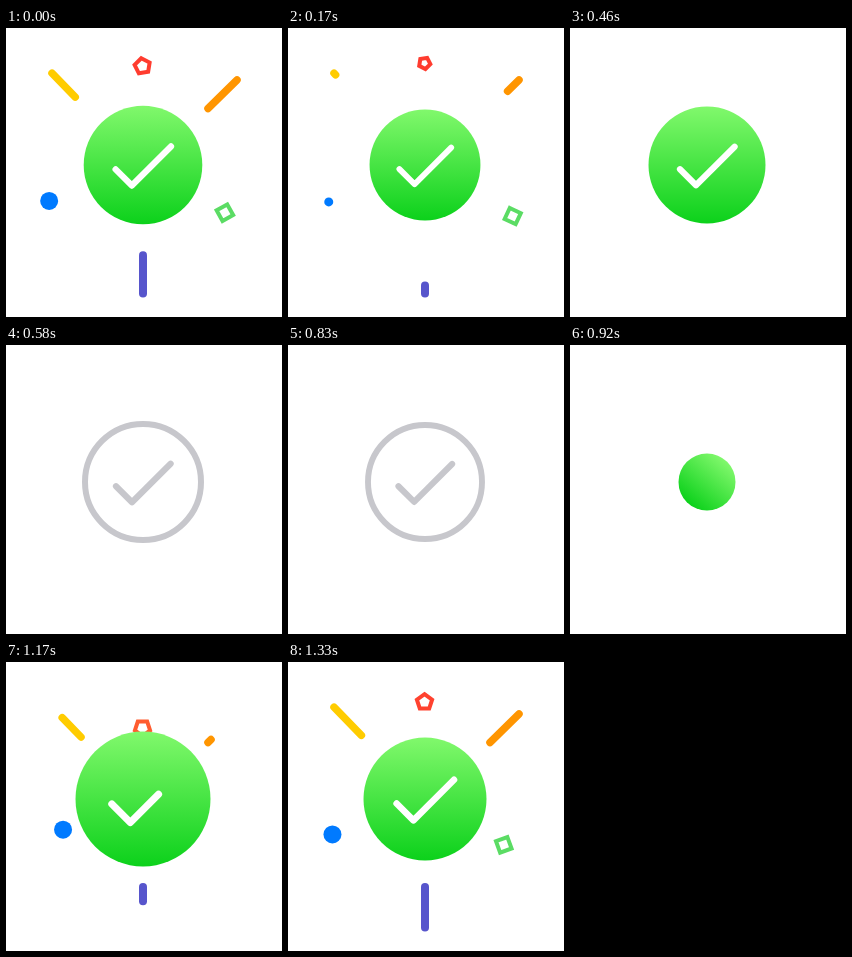
Animation, 276 px wide and 289 px high, one loop 1.37 s. Source, as an HTML page with a canvas:

```html
<!DOCTYPE html>
<html lang="en">
<head>
<meta charset="utf-8">
<title>Check burst</title>
<style>
  html, body { margin: 0; width: 100%; height: 100%; overflow: hidden; background: #fff; }
  canvas { display: block; width: 276px; height: 289px; }
</style>
</head>
<body>
<canvas id="stage"></canvas>
<script>
const W = 276, H = 289, LOOP = 1370, STEPS = 33;
const BASE = 58.5, GREY = '#c7c7cc';
const canvas = document.getElementById('stage');
const ctx = canvas.getContext('2d');
const dpr = window.devicePixelRatio || 1;
canvas.width = W * dpr;
canvas.height = H * dpr;

const clamp = x => Math.min(1, Math.max(0, x));
const lerp = (a, b, u) => a + (b - a) * u;
const ramp = (f, a, b) => {
  const u = clamp((f - a) / (b - a));
  return u * u * (3 - 2 * u);
};
const rad = deg => deg * Math.PI / 180;

// 24 steps per second, each start rounded to 10 ms
const stepStart = n => Math.round(n * 1000 / 240 - 0.01) * 10;
function stepAt(ms) {
  let n = 0;
  while (n < STEPS - 1 && stepStart(n + 1) <= ms) n++;
  return n;
}

function line(points, width, color) {
  ctx.beginPath();
  points.forEach(([x, y]) => ctx.lineTo(x, y));
  ctx.lineWidth = width;
  ctx.lineCap = ctx.lineJoin = 'round';
  ctx.strokeStyle = color;
  ctx.stroke();
}

function polygon(x, y, sides, r, turn, color) {
  ctx.beginPath();
  for (let i = 0; i < sides; i++) {
    const a = rad(turn - 90) + i * 2 * Math.PI / sides;
    ctx.lineTo(x + r * Math.cos(a), y + r * Math.sin(a));
  }
  ctx.closePath();
  ctx.lineWidth = 4;
  ctx.lineJoin = 'miter';
  ctx.strokeStyle = color;
  ctx.stroke();
}

// A ray grows outward from its inner end, then is wiped from the inside
function ray(f, a, b, grow, wipe, width, color) {
  const head = ramp(f, grow, grow + 5);
  const tail = ramp(f, wipe, wipe + 7);
  if (head - tail <= 0.001) return;
  const at = u => [lerp(a[0], b[0], u), lerp(a[1], b[1], u)];
  line([at(tail), at(head)], width, color);
}

const drift = (f, far, gap, k) => far - gap * Math.exp(-k * (f - 28));

function particles(f) {
  ray(f, [75, 75], [46, 45.2], 25, 31, 7.5, '#ffcc00');
  ray(f, [137, 225], [137, 265.5], 26, 32, 8, '#5755cc');
  ray(f, [202, 80.5], [231, 52], 27, 33, 7.5, '#ff9500');

  const dot = 1 - ramp(f, 34, 40);
  if (f >= 25 && dot > 0) {
    const d = drift(f, 104, 18.4, 0.33);
    ctx.beginPath();
    ctx.arc(137 - 0.934 * d, 137 + 0.358 * d, 9 * dot, 0, 2 * Math.PI);
    ctx.fillStyle = '#007aff';
    ctx.fill();
  }

  const turn = -9 * (f - 32);
  const penta = 1 - ramp(f, 35, 41);
  if (f >= 27 && penta > 0) {
    const g = Math.round(lerp(92, 60, clamp((f - 28) / 5)));
    const y = 137 - drift(f, 102.5, 31.5, 0.43);
    polygon(136.5, y, 5, 8 * penta, turn, `rgb(255,${g},47)`);
  }

  const box = 1 - ramp(f, 37, 43.5);
  if (f >= 28 && box > 0) {
    const d = drift(f, 104, 48, 0.33);
    polygon(137 + 0.864 * d, 137 + 0.503 * d, 4, 8.6 * box, turn + 25, '#5bdc64');
  }
}

function check(scale, part, color) {
  if (part <= 0) return;
  const p = [[-27, 4.3], [-11, 20.3], [27.6, -18.3]];
  const len = i => Math.hypot(p[i + 1][0] - p[i][0], p[i + 1][1] - p[i][1]);
  let left = part * (len(0) + len(1));
  const path = [p[0]];
  for (let i = 0; i < 2 && left > 0; i++) {
    const u = Math.min(1, left / len(i));
    path.push([lerp(p[i][0], p[i + 1][0], u), lerp(p[i][1], p[i + 1][1], u)]);
    left -= len(i);
  }
  line(path.map(([x, y]) => [137 + x * scale, 137 + y * scale]), 6.2 * scale, color);
}

function radius(f) {
  if (f < 28) return lerp(28.5, 67.5, Math.sin((f - 22) / 6 * Math.PI / 2));
  if (f < 36) return lerp(67.5, 55.5, ramp(f, 28, 36));
  return lerp(55.5, 55.3, ramp(f, 36, 39)) + 3.2 * ramp(f, 39, 44);
}

function badge(f) {
  const r = radius(f);
  const spin = rad(40 * (1 - Math.sin(clamp((f - 22) / 6) * Math.PI / 2)));
  const dx = r * Math.sin(spin), dy = r * Math.cos(spin);
  const fill = ctx.createLinearGradient(137 + dx, 137 - dy, 137 - dx, 137 + dy);
  fill.addColorStop(0, '#81f86c');
  fill.addColorStop(1, '#0cd11b');
  ctx.beginPath();
  ctx.arc(137, 137, r, 0, 2 * Math.PI);
  ctx.fillStyle = fill;
  ctx.fill();
  check(r / BASE, ramp(f, 24, 30), '#fff');
}

function ring(f) {
  const scale = 1 - 0.51 * Math.pow(clamp((f - 18) / 4), 4.9);
  ctx.beginPath();
  ctx.arc(137, 137, 58 * scale, 0, 2 * Math.PI);
  ctx.lineWidth = 6 * scale;
  ctx.strokeStyle = GREY;
  ctx.stroke();
  check(scale, 1, GREY);
}

function draw(ms) {
  const n = stepAt(ms);
  ctx.setTransform(dpr, 0, 0, dpr, 0, 0);
  ctx.fillStyle = '#fff';
  ctx.fillRect(0, 0, W, H);
  if (n >= 14 && n < 22) {
    ring(n);
  } else {
    const f = n < 14 ? n + STEPS : n;
    particles(f);
    badge(f);
  }
}

const begin = performance.now();
function tick() {
  draw((performance.now() - begin) % LOOP);
  requestAnimationFrame(tick);
}
tick();
</script>
</body>
</html>
```
